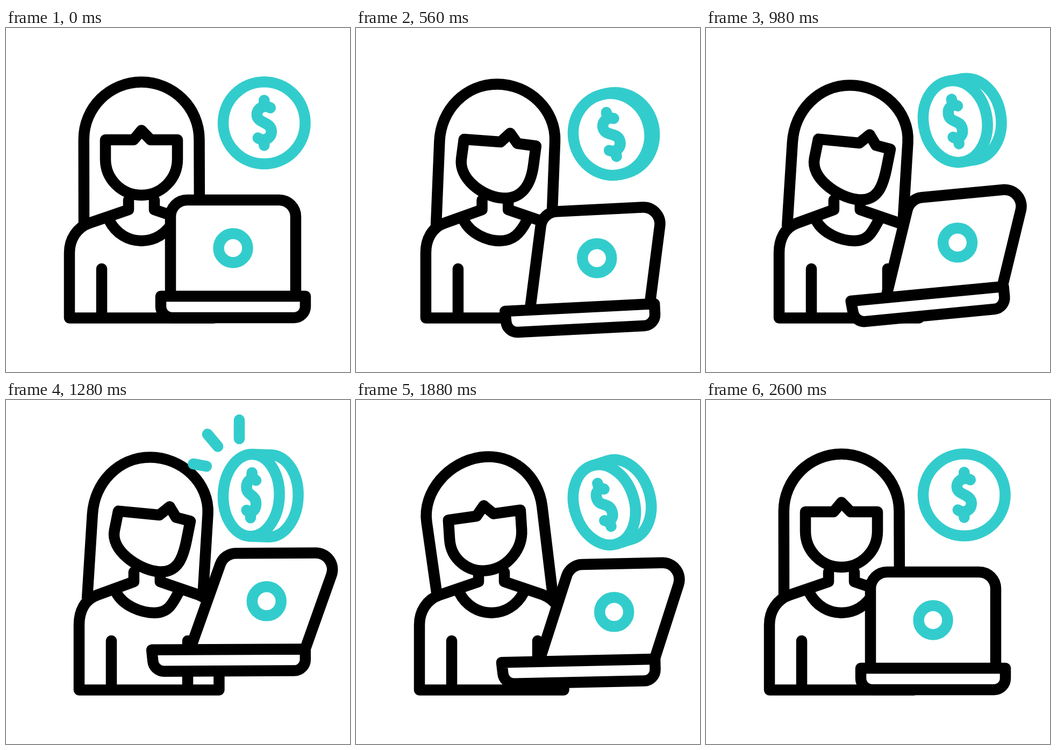
Recreate the animation shown at these times as an HTML page with a canvas. Size 640 px wide and 640 px high, loop 3000 ms.

```html
<!DOCTYPE html>
<html lang="en">
<head>
<meta charset="utf-8">
<title>Online earnings</title>
<style>
  html, body { margin: 0; width: 100%; height: 100%; overflow: hidden; background: #fff; }
  canvas { display: block; width: 100vw; height: 100vh; }
</style>
</head>
<body>
<canvas id="stage"></canvas>
<script>
const LOOP = 3000, SIZE = 640, LINE = 20.5;
const BLACK = '#000', TEAL = '#33cccc', WHITE = '#fff';
const MID = 252; // the woman's axis
const COIN_R = 76.3;

const canvas = document.getElementById('stage');
const ctx = canvas.getContext('2d');
const ratio = Math.max(1, window.devicePixelRatio || 1);
canvas.width = canvas.height = SIZE * ratio;

// Time, swing, height of the right hinge, rise of the base from left to right
const lapKeys = [
  [220, 0, 499, 0],
  [560, 0.352, 513, 14],
  [750, 0.49, 518, 19],
  [980, 0.676, 481, 27],
  [1580, 1, 456, -24],
  [1880, 0.817, 482, 6],
  [2110, 0.367, 504.5, 22],
  [2280, 0.268, 503, 16],
  [2600, 0, 499, 0]
];

// Time, turn and tilt in degrees, centre height
const coinKeys = [
  [220, 0, 0, 176.5],
  [560, 21.5, -13, 198],
  [980, 39, -9.5, 174],
  [1580, 50.5, 11, 184],
  [1880, 43, -17.5, 195],
  [2280, 0, -4, 176.5],
  [2600, 0, 0, 176.5]
];

const rad = deg => deg * Math.PI / 180;

// Smooth step from 0 to 1 between two times
function ease(t, from, to) {
  const u = Math.min(1, Math.max(0, (t - from) / (to - from)));
  return u * u * (3 - 2 * u);
}

// Monotone cubic through the keys: eases only where a value turns
function sample(keys, t) {
  const last = keys.length - 1;
  if (t <= keys[0][0]) return keys[0].slice(1);
  if (t >= keys[last][0]) return keys[last].slice(1);
  let k = 0;
  while (t >= keys[k + 1][0]) k++;
  const span = i => keys[i + 1][0] - keys[i][0];
  const h = span(k), u = (t - keys[k][0]) / h;
  return keys[k].slice(1).map((v, j) => {
    const c = j + 1;
    const rate = i => (keys[i + 1][c] - keys[i][c]) / span(i);
    const slope = i => {
      if (i === 0 || i === last) return 0;
      const a = rate(i - 1), b = rate(i);
      return a * b <= 0 ? 0 : 2 * a * b / (a + b);
    };
    const d = keys[k + 1][c] - v, m0 = slope(k) * h, m1 = slope(k + 1) * h;
    return v + u * (m0 + u * (3 * d - 2 * m0 - m1 + u * (m0 + m1 - 2 * d)));
  });
}

function stroke(color, fill) {
  if (fill) { ctx.fillStyle = fill; ctx.fill(); }
  ctx.strokeStyle = color;
  ctx.stroke();
}

function line(...points) {
  points.forEach(([x, y], i) => i ? ctx.lineTo(x, y) : ctx.moveTo(x, y));
}

const add = (a, b) => [a[0] + b[0], a[1] + b[1]];

// Point at a distance from p, heading from a to b
function along(p, a, b, dist) {
  const x = b[0] - a[0], y = b[1] - a[1], k = dist / Math.hypot(x, y);
  return [p[0] + x * k, p[1] + y * k];
}

// Half oval a - m - b whose sides carry on the lines fromA - a and toB - b
function dome(fromA, a, m, b, toB, pull) {
  ctx.bezierCurveTo(...along(a, fromA, a, pull), ...along(m, b, a, pull), ...m);
  ctx.bezierCurveTo(...along(m, a, b, pull), ...along(b, toB, b, pull), ...b);
}

// Head tilt leans the skull; it fades towards the chin
const tilted = ([x, y], tilt) =>
  [x - tilt * (6.5 + 0.065 * (311 - y)), y + tilt * (6 - 0.139 * (x - MID))];

function drawHair(turn, tilt) {
  const skull = (x, y) => add(tilted([x, y], tilt), [16 * turn, 6 * turn]);
  const end = (x, y) => [x + 6 * turn + 7 * tilt, y + 5 * turn + 7 * tilt];
  const a = end(145, 365), b = end(360, 364);
  const left = skull(144.8, 207), top = skull(MID, 100.5), right = skull(359.5, 207);
  ctx.beginPath();
  line(a, left);
  dome(a, left, top, right, b, 59);
  ctx.lineTo(...b);
  ctx.lineCap = 'butt';
  stroke(BLACK);
  ctx.lineCap = 'round';
}

function drawFace(turn, tilt) {
  // Turning moves the middle of the face further than its edges.
  const skin = (dx, y) => {
    const bulge = 1 - (dx / 67) ** 2;
    const shift = [24 - 0.2 * (y - 208) + 25 * bulge, 8 + 0.14 * dx];
    return add(tilted([MID + dx, y], tilt), [shift[0] * turn, shift[1] * turn]);
  };
  const fringe = [[-67, 208], [-14.5, 208], [0, 190.5], [17, 208], [67, 208]].map(p => skin(...p));
  const right = skin(67, 244), chin = skin(0, 311), left = skin(-67, 244);
  ctx.beginPath();
  line(...fringe, right);
  dome(fringe[4], right, chin, left, fringe[0], 37);
  ctx.closePath();
  stroke(BLACK);
}

function drawBody(turn) {
  const b = 18 * turn;
  const left = 118 + b, right = 386.5 + b * 0.55;
  const neckL = 228 + b * 0.55, neckR = 276 + b * 0.6;
  const slopeL = 155 + b * 0.8, slopeR = 347 + b * 0.55;
  ctx.beginPath();
  line([neckL, 320], [neckL, 338], [slopeL, 363]);
  ctx.bezierCurveTo(slopeL - 23, 371, left, 393, left, 418);
  ctx.lineTo(left, 539.5);
  ctx.lineTo(right, 539.5);
  ctx.lineTo(right, 418);
  ctx.bezierCurveTo(right, 393, slopeR + 23, 371, slopeR, 362);
  ctx.lineTo(neckR, 338);
  ctx.lineTo(neckR, 320);
  for (const arm of [178 + b, 338]) line([arm, 539], [arm, 448]);
  const c0 = 192 + b * 0.72, c1 = MID + b * 1.33, c2 = 312 + b * 0.5;
  ctx.moveTo(c0, 358);
  ctx.bezierCurveTo(c0 + 13, 383, c1 - 24, 396, c1, 396);
  ctx.bezierCurveTo(c1 + 24, 396, c2 - 13, 383, c2, 358);
  stroke(BLACK);
}

function drawLaptop([swing, hinge, rise]) {
  const open = Math.sin(swing * Math.PI / 2);
  const width = 269 + 17 * open;
  const b = [557 - 0.13 * rise, hinge], a = [b[0] - width, hinge + rise];
  const deck = x => [x, hinge + rise * (b[0] - x) / width];

  // The screen is a parallelogram standing on the base.
  const p = deck(a[0] + 18 + 54 * open), q = deck(b[0] - 18 * (1 - open));
  const up = [72 * swing - 0.15 * rise, -179 - 0.2 * rise];
  const s = add(p, up), r = add(q, up);
  ctx.beginPath();
  ctx.moveTo(...p);
  ctx.arcTo(...s, ...r, 31);
  ctx.arcTo(...r, ...q, 31);
  ctx.lineTo(...q);
  stroke(BLACK, WHITE);

  const down = [40 * rise / width, 40];
  const c = add(b, down), d = add(a, add(down, [4 * open, 0]));
  ctx.beginPath();
  line(a, b);
  ctx.arcTo(...c, ...d, 21);
  ctx.arcTo(...d, ...a, 21);
  ctx.closePath();
  stroke(BLACK, WHITE);

  ctx.beginPath();
  ctx.arc((p[0] + r[0]) / 2 + 4 * swing, (p[1] + r[1]) / 2, 27, 0, Math.PI * 2);
  stroke(TEAL, WHITE);
}

function drawCoin([turn, tilt, cy]) {
  const a = rad(tilt), cos = Math.cos(a), sin = Math.sin(a);
  const rx = COIN_R * Math.cos(rad(turn)), ry = COIN_R;
  const cx = 404 + Math.hypot(rx * cos, ry * sin);
  const depth = 66 * Math.sin(rad(turn)) ** 2;
  const face = x => {
    ctx.beginPath();
    ctx.ellipse(x, 0, rx, ry, 0, 0, Math.PI * 2);
    stroke(TEAL, WHITE);
  };
  ctx.save();
  ctx.translate(cx, cy);
  ctx.rotate(a);
  if (depth > 0.1) {
    face(depth);
    ctx.beginPath();
    for (const y of [-ry, ry]) line([0, y], [depth, y]);
    stroke(TEAL);
  }
  face(0);

  // Squeeze the dollar sign's path, not its line.
  ctx.save();
  ctx.scale(rx / ry, 1);
  ctx.beginPath();
  ctx.moveTo(11.5, -28);
  ctx.bezierCurveTo(1, -34, -13.5, -28, -13.5, -15.5);
  ctx.bezierCurveTo(-13.5, 1.5, 13.5, -2.5, 13.5, 16);
  ctx.bezierCurveTo(13.5, 30, -2, 35, -11.5, 28);
  for (const side of [-1, 1]) line([0, 42 * side], [0, 31 * side]);
  ctx.restore();
  stroke(TEAL);
  ctx.restore();
}

function drawSparks(k) {
  if (k < 0.01) return;
  ctx.beginPath();
  for (let i = 0; i < 3; i++) {
    const a = rad(270 - 40 * i);
    const at = r => [434 + r * Math.cos(a), 134 + r * Math.sin(a)];
    line(at(62), at(62 + (35 - 5 * i) * k));
  }
  stroke(TEAL);
}

function draw(t) {
  const turn = ease(t, 220, 780) - ease(t, 1430, 1810);
  const tilt = ease(t, 1500, 1880) - ease(t, 1880, 2280);
  ctx.setTransform(ratio, 0, 0, ratio, 0, 0);
  ctx.fillStyle = WHITE;
  ctx.fillRect(0, 0, SIZE, SIZE);
  ctx.lineWidth = LINE;
  ctx.lineCap = ctx.lineJoin = 'round';
  drawHair(turn, tilt);
  drawBody(turn);
  drawFace(turn, tilt);
  drawLaptop(sample(lapKeys, t));
  drawSparks(ease(t, 1030, 1290) - ease(t, 1290, 1660));
  drawCoin(sample(coinKeys, t));
}

const start = performance.now();
function tick() {
  draw((performance.now() - start) % LOOP);
  requestAnimationFrame(tick);
}
tick();
</script>
</body>
</html>
```
